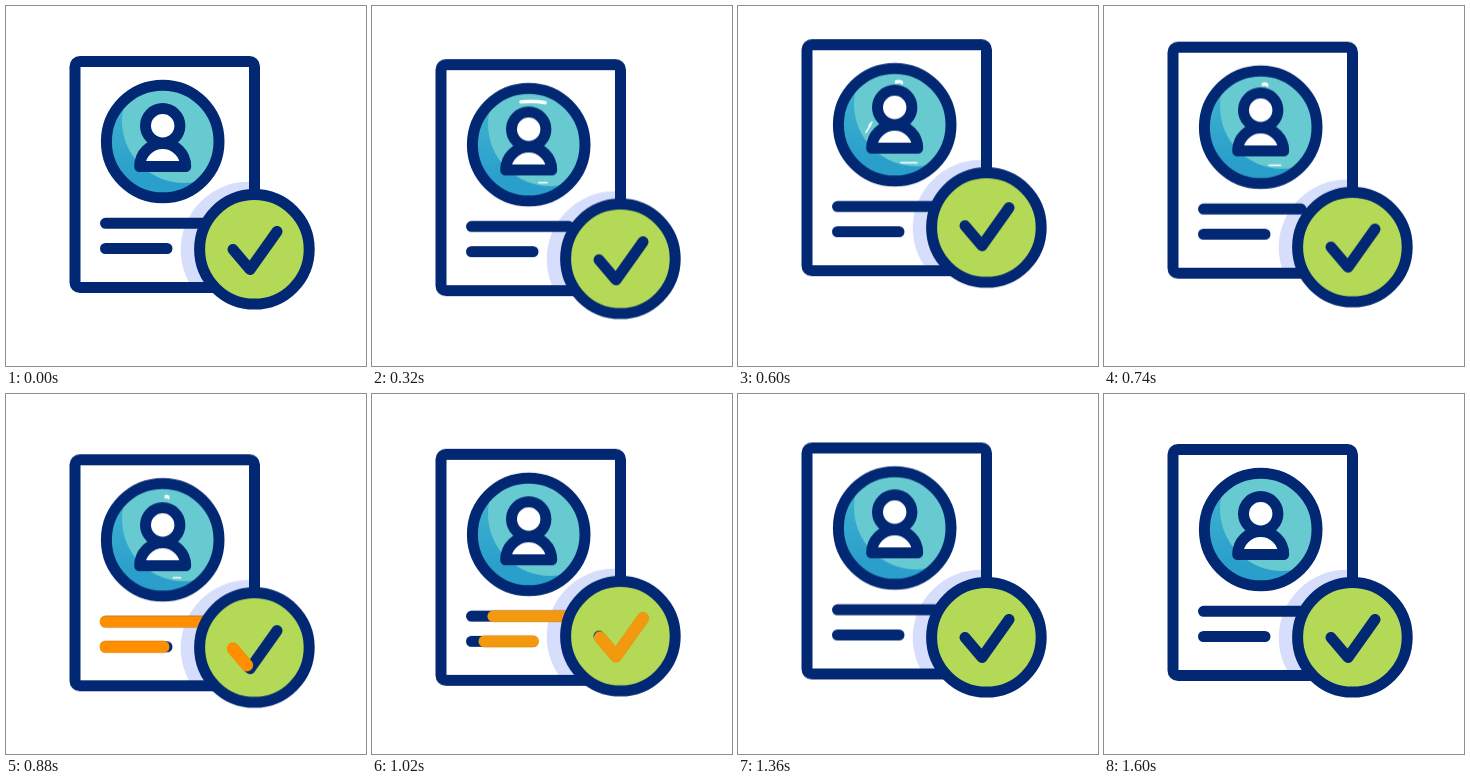
These frames come from a looping animation (360 px wide and 360 px high, 1660 ms). An HTML page:

```html
<!DOCTYPE html>
<html lang="en">
<head>
<meta charset="utf-8">
<title>Verified profile</title>
<style>
  @property --head { syntax: "<length>"; inherits: false; initial-value: 0px; }
  @property --tail { syntax: "<length>"; inherits: false; initial-value: 0px; }

  html, body { margin: 0; width: 100%; height: 100%; overflow: hidden; background: #fff; }
  svg { display: block; width: 100vw; height: 100vh; }

  .ink { fill: none; stroke: #022873; stroke-width: 11; stroke-linecap: round; stroke-linejoin: round; }
  .white { fill: #fff; }
  .green { fill: #b3d957; }

  /* The badge leads, the card follows; inner parts swing slightly further. */
  .card, .badge { --k: 1px; animation: card 1660ms cubic-bezier(.37, 0, .63, 1) infinite; }
  .badge { animation-name: badge; }
  .extra { --k: .09px; }
  @keyframes card {
    0%, 15.96% { transform: translateY(0); }
    25.3% { transform: translateY(calc(11 * var(--k))); }
    40.06% { transform: translateY(calc(-22 * var(--k))); }
    54.22% { transform: translateY(calc(10.8 * var(--k))); }
    72.29% { transform: translateY(calc(-6.3 * var(--k))); }
    86.75%, 100% { transform: translateY(0); }
  }
  @keyframes badge {
    0%, 12.05% { transform: translateY(0); }
    21.69% { transform: translateY(calc(11 * var(--k))); }
    36.14% { transform: translateY(calc(-21.8 * var(--k))); }
    51.2% { transform: translateY(calc(10.8 * var(--k))); }
    66.87% { transform: translateY(calc(-5.4 * var(--k))); }
    81.33%, 100% { transform: translateY(0); }
  }

  /* Orange stroke that runs along a line: the head draws, the tail erases. */
  .run {
    fill: none; stroke: #ff8f00; stroke-width: 11.8; stroke-linecap: round; stroke-linejoin: round;
    stroke-dasharray: calc(var(--head) - var(--tail)) 300px;
    stroke-dashoffset: calc(-1 * var(--tail));
    animation: 1660ms cubic-bezier(.37, 0, .63, 1) infinite;
    animation-name: lineHead, lineTail, lineShow, tint;
  }
  .run.tick { stroke-width: 12.4; animation-name: tickHead, tickTail, tickShow, tint; }
  @keyframes lineHead { 0%, 44.58% { --head: 0px; } 54.6%, 100% { --head: 100px; } }
  @keyframes lineTail { 0%, 57.83% { --tail: 0px; } 69.88%, 100% { --tail: 100px; } }
  @keyframes lineShow {
    0% { opacity: 0; animation-timing-function: step-end; }
    45.2% { opacity: 1; animation-timing-function: step-end; }
    69.88%, 100% { opacity: 0; }
  }
  @keyframes tickHead { 0%, 48.2% { --head: 0px; } 61.45%, 100% { --head: 100px; } }
  @keyframes tickTail { 0%, 60.24% { --tail: 0px; } 73.49%, 100% { --tail: 100px; } }
  @keyframes tickShow {
    0% { opacity: 0; animation-timing-function: step-end; }
    48.8% { opacity: 1; animation-timing-function: step-end; }
    73.49%, 100% { opacity: 0; }
  }
  @keyframes tint { 0%, 54% { stroke: #ff8f00; } 68%, 100% { stroke: #e9a11c; } }

  .glint {
    fill: none; stroke: #fff; stroke-linecap: round;
    transform-box: fill-box; transform-origin: center;
    animation: glintTop 1660ms linear infinite;
  }
  .glint.low { animation-name: glintLow; }
  .glint.side { animation-name: glintSide; }
  @keyframes glintTop {
    0%, 13.3% { transform: scaleX(0); }
    19.3% { transform: scaleX(1); }
    36.1% { transform: scaleX(.3); }
    53% { transform: scaleX(.18); }
    57.8%, 100% { transform: scaleX(0); }
  }
  @keyframes glintLow {
    0%, 13.3% { transform: scaleX(0); }
    19.3% { transform: scaleX(.55); }
    36.1% { transform: scaleX(1); }
    53% { transform: scaleX(.5); }
    57.8%, 100% { transform: scaleX(0); }
  }
  @keyframes glintSide {
    0%, 28% { opacity: 0; }
    34%, 38% { opacity: 1; }
    44%, 100% { opacity: 0; }
  }
</style>
</head>
<body>
<svg viewBox="0 0 360 360">
  <defs>
    <clipPath id="sheet"><rect class="card" x="69" y="55.5" width="179.5" height="226"/></clipPath>
    <clipPath id="disc"><circle cx="156.7" cy="135.5" r="57"/></clipPath>
    <linearGradient id="shade" x2="0" y2="1">
      <stop offset=".1" stop-color="#42b4d0"/>
      <stop offset=".8" stop-color="#2a9fcb"/>
    </linearGradient>
  </defs>

  <g clip-path="url(#sheet)">
    <circle class="badge" cx="242.7" cy="243.8" r="68" fill="#d6defb"/>
  </g>

  <g class="card">
    <rect class="ink" x="69" y="55.5" width="179.5" height="226" rx="5"/>

    <g clip-path="url(#disc)">
      <circle cx="156.7" cy="135.5" r="57" fill="url(#shade)"/>
      <circle cx="178" cy="115" r="62" fill="#67cad1"/>
    </g>
    <path class="glint" d="M149 92.8Q161 91.4 173 93.6" stroke-width="3.6"/>
    <path class="glint low" d="M163 173.5h16" stroke-width="1.6"/>
    <path class="glint side" d="M128 143l5-8M131 136l3-3" stroke-width="1.6"/>
    <circle class="ink" cx="156.7" cy="135.5" r="56.3"/>
    <g class="card extra">
      <path class="ink white" d="M133.7 160.5a23 23 0 0 1 46 0z"/>
      <circle class="ink white" cx="156.7" cy="119.7" r="17.2"/>
    </g>

    <path class="ink" d="M99.5 217.3H197M99.5 242.5H161"/>
    <path class="run" pathLength="94" d="M99.5 217.3H197"/>
    <path class="run" pathLength="100" d="M99.5 242.5H161"/>
  </g>

  <g class="badge">
    <circle class="ink green" cx="248.4" cy="243.3" r="54.8"/>
    <g class="badge extra">
      <path class="ink" d="M227 243.5L244 263.5L271 225.5"/>
      <path class="run tick" pathLength="100" d="M227 243.5L244 263.5L271 225.5"/>
    </g>
  </g>
</svg>
</body>
</html>
```
